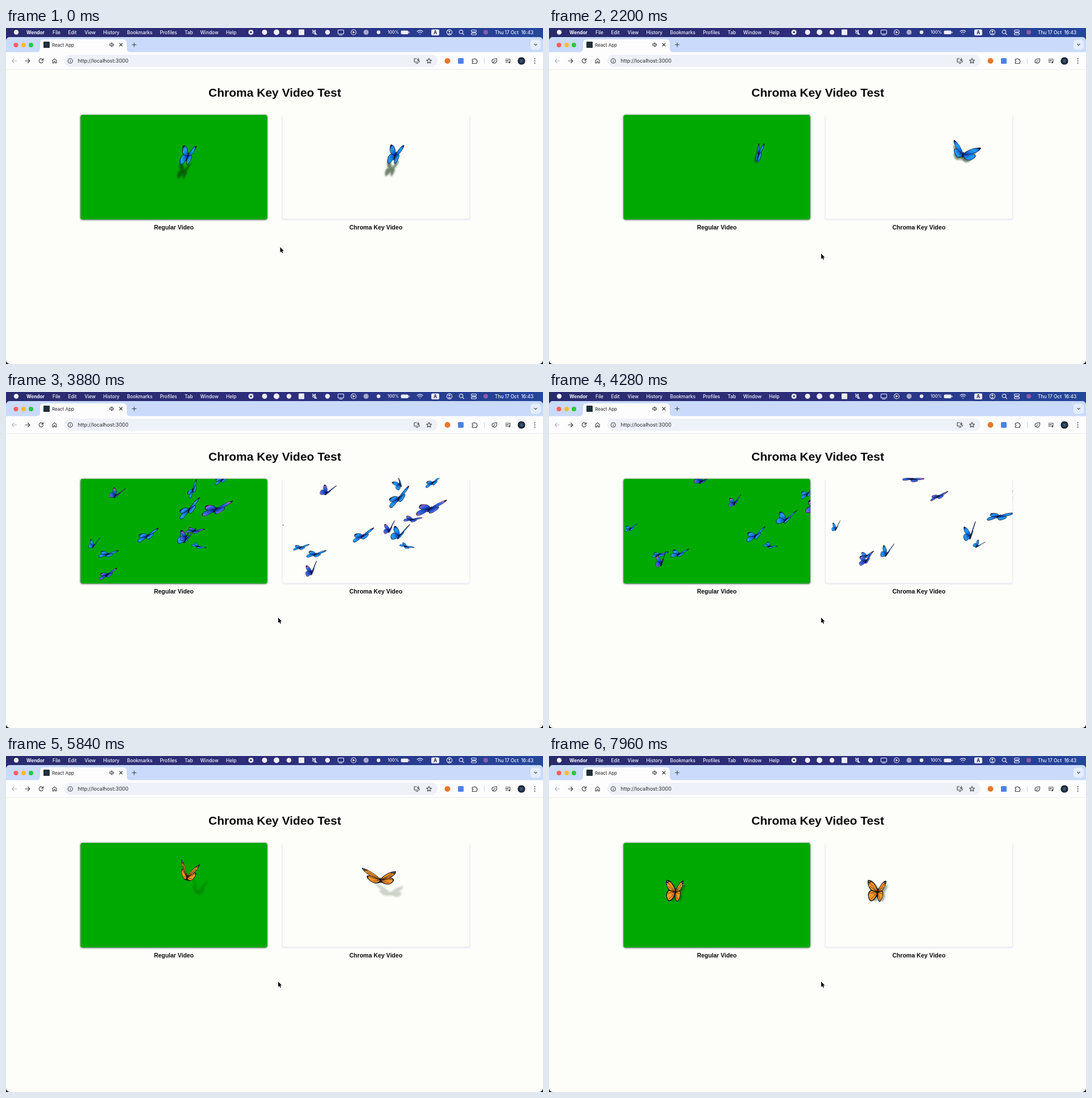
Recreate the animation shown at these times as an HTML page with a canvas. Size 947 px wide and 592 px high, loop 8000 ms.

```html
<!DOCTYPE html>
<html lang="en">
<head>
<meta charset="utf-8">
<title>Chroma Key Video Test</title>
<style>
html, body { margin: 0; width: 100%; height: 100%; overflow: hidden; background: #000; }
svg, canvas { position: absolute; left: 0; top: 0; width: 947px; height: 592px; display: block; }
text { font-family: Inter, "Liberation Sans", sans-serif; }
.menu text { font-size: 8.3px; font-weight: 500; fill: #f4f4fa; white-space: pre; }
.page text { font-family: "Liberation Sans", Arial, sans-serif; font-weight: 700; fill: #0a0a0a; text-anchor: middle; }
.line { fill: none; stroke-width: 1.1; stroke-linecap: round; stroke-linejoin: round; }
.menu .line { stroke: #eeeef8; }
.bar .line { stroke: #3c4043; }
</style>
</head>
<body>
<svg viewBox="0 0 947 592">
  <defs>
    <linearGradient id="sky">
      <stop offset="0" stop-color="#2a2b6e"/><stop offset=".5" stop-color="#2e2d7a"/><stop offset=".75" stop-color="#293a8c"/><stop offset="1" stop-color="#24469c"/>
    </linearGradient>
    <radialGradient id="face"><stop offset="0" stop-color="#3f6f86"/><stop offset=".6" stop-color="#23304a"/><stop offset="1" stop-color="#15171f"/></radialGradient>
    <filter id="soft" x="-10%" y="-10%" width="120%" height="125%"><feGaussianBlur stdDeviation="1.5"/></filter>
  </defs>
  <rect width="947" height="592" fill="#05050a"/>
  <rect width="947" height="24" fill="url(#sky)"/>
  <rect y="16" width="947" height="576" rx="7" fill="#fdfdfa"/>
  <path d="M0 43V23a7 7 0 0 1 7-7H940a7 7 0 0 1 7 7V43Z" fill="#c9dafa"/>

  <g class="menu">
    <circle cx="18" cy="7.5" r="4.2" fill="#f4f4fa"/>
    <text x="36" y="10.5" style="font-weight:700">Wendor</text>
    <text x="82" y="10.5">File</text><text x="109.5" y="10.5">Edit</text>
    <text x="138.5" y="10.5">View</text><text x="171.5" y="10.5">History</text>
    <text x="213.5" y="10.5">Bookmarks</text><text x="271.5" y="10.5">Profiles</text>
    <text x="315" y="10.5">Tab</text><text x="342.5" y="10.5">Window</text><text x="388" y="10.5">Help</text>
    <g fill="#eeeef8">
      <circle cx="432" cy="7.5" r="4.5"/><circle cx="456" cy="7.5" r="4.5"/>
      <circle cx="477" cy="7.5" r="5"/><circle cx="499" cy="7.5" r="4.2"/>
      <rect x="516" y="2.5" width="10" height="10" rx="1"/>
      <circle cx="567" cy="7.5" r="4.2"/><circle cx="635" cy="7.5" r="4.5" fill="#a9a8cc"/>
      <circle cx="657" cy="7.5" r="3.2"/>
      <rect x="696.5" y="4.5" width="13" height="6.5" rx="1.8"/><rect x="710.3" y="6.3" width="1.2" height="3" rx=".6"/>
      <rect x="750" y="2.5" width="14" height="10.5" rx="2"/>
      <path d="M611.5 5.2v4.6l4-2.3Z"/><path d="M779.2 10.6a3 2.6 0 0 1 5.6 0Z"/><circle cx="782" cy="6" r="1.6"/>
    </g>
    <rect x="430.5" y="6" width="3" height="3" fill="#2d2b72"/>
    <g class="line">
      <path d="M541 6h2l2.5-2.5v8L543 9h-2ZM540.5 3.5l7.5 8"/>
      <rect x="585.5" y="3.5" width="10" height="7" rx="1"/><path d="M588 12.5h5"/>
      <circle cx="613" cy="7.5" r="4.5"/><circle cx="782" cy="7.5" r="4.6"/>
      <path d="M725 6.2a7 7 0 0 1 10 0M727 8.3a4.3 4.3 0 0 1 6 0M729.3 10.7h1.4"/>
      <circle cx="802.5" cy="6.8" r="3.2"/><path d="M805 9.3l2.5 2.5"/>
      <rect x="820.5" y="3.5" width="9" height="3.4" rx="1.7"/><rect x="820.5" y="8.6" width="9" height="3.4" rx="1.7"/>
    </g>
    <circle cx="846" cy="7.5" r="4" fill="#8a5fa8"/>
    <text x="673" y="10.3" style="font-size:7.4px">100%</text>
    <text x="757" y="10.8" text-anchor="middle" style="fill:#2a2a6a;font-weight:700">A</text>
    <text x="862" y="10.5">Thu 17 Oct  16:43</text>
  </g>

  <g class="bar">
    <circle cx="17.5" cy="30" r="4" fill="#fe5f57"/><circle cx="31" cy="30" r="4" fill="#febc2e"/><circle cx="44" cy="30" r="4" fill="#28c840"/>
    <path d="M53 43q7 0 7-7V27q0-7 7-7H206q7 0 7 7v9q0 7 7 7Z" fill="#fdfdfe"/>
    <rect y="42.5" width="947" height="30.5" fill="#fdfdfe"/>
    <path d="M0 73.2H947" stroke="#e6e8ee" stroke-width=".8"/>
    <rect x="66" y="24" width="11" height="11" rx="1" fill="#20303a"/>
    <text x="81" y="32.5" font-size="8" fill="#202124">React App</text>
    <rect x="925" y="20.5" width="18" height="18" rx="5" fill="#e4edfd"/>
    <rect x="103" y="47" width="658" height="21.5" rx="10.7" fill="#eff1f9"/>
    <text x="126.5" y="61.2" font-size="9" fill="#26282c">http://localhost:3000</text>
    <g class="line">
      <path d="M183 28h1.8l2.2-2v7l-2.2-2H183ZM188.8 27.5a3 3 0 0 1 0 4"/>
      <path d="M200 27l5 5M205 27l-5 5M222.5 29.5h7M226 26v7M931.8 28.4l2.2 2.2 2.2-2.2"/>
      <path d="M18.5 58h-8M14 54.5l-3.5 3.5 3.5 3.5" style="stroke:#b4b7bb"/>
      <path d="M34 58h8M38.5 54.5L42 58l-3.5 3.5"/>
      <path d="M65.3 56.3a3.7 3.7 0 1 0 .2 2.6M65.6 53.8v2.8h-2.8"/>
      <path d="M82 57.2l3.5-3 3.5 3v4.6h-2.3v-2.6h-2.4v2.6H82Z"/>
      <circle cx="113.3" cy="58" r="4"/><path d="M113.3 57.8v2M113.3 56v.1"/>
      <path d="M724 54h-4v6h9v-2M723 62.3h3.5M727 53.2v4M725.3 55.8l1.7 1.7 1.7-1.7"/>
      <path d="M746 53.4l1.3 3 3.2.3-2.4 2.1.7 3.2-2.8-1.7-2.8 1.7.7-3.2-2.4-2.1 3.2-.3Z"/>
      <path d="M822.3 55h2.5a1.3 1.3 0 0 1 2.6 0h2.6v2.5a1.3 1.3 0 0 1 0 2.6v2.4h-7.7V60a1.3 1.3 0 0 0 0-2.6Z"/>
      <path d="M857.5 60.5a4 4 0 0 1 1-5q2-1.4 7-1.5.5 5-2 7.2-3 2-6-.7M859 61l3.5-4"/>
      <path d="M881 55h8M881 57.6h5M881 60.2h3.5M888.8 55v5.6"/><circle cx="887.6" cy="60.6" r="1"/>
    </g>
    <path d="M843.5 53v10" stroke="#c9d6f0"/>
    <circle cx="778.5" cy="58" r="5" fill="#e5782c"/>
    <rect x="797" y="53" width="10" height="10" rx="1.5" fill="#4c83e0"/>
    <circle cx="909" cy="58" r="6.6" fill="url(#face)"/>
    <g fill="#3c4043"><circle cx="932.5" cy="54.3" r="1"/><circle cx="932.5" cy="58" r="1"/><circle cx="932.5" cy="61.7" r="1"/></g>
  </g>

  <g class="page">
    <text x="474" y="120.5" font-size="21">Chroma Key Video Test</text>
    <rect x="131" y="153.2" width="330" height="185" rx="4" fill="#000" opacity=".6" filter="url(#soft)"/>
    <rect x="131.5" y="153" width="329" height="184.5" rx="4" fill="#00a902"/>
    <rect x="487.5" y="154" width="330" height="183.8" rx="4" fill="#cfcfe6" opacity=".7" filter="url(#soft)"/>
    <rect x="488" y="151.5" width="329" height="185" rx="4" fill="#fdfdfa"/>
    <text x="296" y="355.2" font-size="10.45">Regular Video</text>
    <text x="652.3" y="355.2" font-size="10.55">Chroma Key Video</text>
  </g>
</svg>
<canvas id="stage" width="947" height="592"></canvas>
<script>
const ctx = document.getElementById('stage').getContext('2d');
const LOOP = 8, LEAD = 0.08, BEAT = 0.1867;

// A pose holds three vectors: body (towards the head), left span, right span.
const REST_SHUT = [4, -18, -2, -6, 7, -6];
const REST_OPEN = [3, -13, -18, -16, 29, -2];
const GLIDE = [7, -20, -12.5, -3, 9, -3];
const SWARM_FLAT = [.3, -.34, -.75, .16, .75, -.1];
const SWARM_UP = [.2, -.5, -.5, -.35, .35, -.6];
const SOLO_UP = [-2, -8, -12, 8, 16, -4];
const SOLO_DOWN = [-2, -8, -6, 16, 18, 2];
const MONARCH_WIDE = [-2, -12, -30.5, -12, 27.5, -6];
const MONARCH_UP = [2, -13, -11, -22, 20, -13];
const MONARCH_REST = [3, -21, -19, -5, 13, -3.5];
const MONARCH_SHUT = [3, -21, -10, -6, 7, -4];

// Wing phases over one LEAD: staying flat, staying up, rising, falling.
const FLAT = -2.4, UP = .73, RISE = -.84, FALL = 2.3;

// x, y, step x, step y (per LEAD), size, tilt, wing phase, pink
const SWARM = [
  [62, 30, 15, -5, 21, .35, UP, 1], [191, 55, 13, -20, 29, -.4, FLAT, 0],
  [238, 54, 21, -1, 34, 0, FLAT, 1], [249, 2, 15, 5, 19, -.2, FLAT, 0],
  [198, 20, 9, -10, 20, -.8, RISE, 0], [117, 101, 23, 0, 25, -.15, FLAT, 0],
  [185, 108, 20, -7, 27, .15, UP, 0], [207, 119, 10, 0, 15, .6, FLAT, 0],
  [23, 118, 8, 3, 17, .1, FALL, 0], [47, 133, 10, 0, 21, .15, FLAT, 0],
  [47, 169, 4, -4, 21, -.15, RISE, 1], [186, 103, 2, -12, 19, -.1, UP, 1],
  [200, 92, 27, -20, 19, .3, FLAT, 1], [-18, 88, 6, 0, 15, 0, FLAT, 0]
];

const clamp = v => Math.max(0, Math.min(1, v));
const mix = (a, b, k) => a + (b - a) * k;
const blend = (p, q, k) => p.map((v, i) => mix(v, q[i], k));
const beat = (t, start, period = BEAT) => (1 - Math.cos(2 * Math.PI * (t - start) / period)) / 2;

const fore = new Path2D('M0 .05C.15 .45 .6 .9 1 .75C1.02 .5 .85 .15 .55 .02L0 0Z');
const hind = new Path2D('M0 .05L.55 .02C.85 -.1 .88 -.5 .6 -.8C.4 -.98 .1 -.55 0 -.1Z');

function wingPaint(stops) {
  const g = ctx.createRadialGradient(.1, 0, 0, .1, 0, 1.14);
  stops.forEach(([at, colour]) => g.addColorStop(at, colour));
  return g;
}
const PAINT = {
  blue: wingPaint([[0, '#0e2f9c'], [.25, '#1268dc'], [.6, '#22a0f2'], [.84, '#1c6cdc'], [.93, '#070a1c'], [1, '#070a1c']]),
  pink: wingPaint([[0, '#101a78'], [.35, '#2050d4'], [.62, '#3f6ae0'], [.82, '#b45cc6'], [.93, '#0a0a20'], [1, '#0a0a20']]),
  orange: wingPaint([[0, '#e0700c'], [.45, '#fb9c2a'], [.78, '#f58e1c'], [.85, '#15100c'], [1, '#15100c']])
};

function wing(sx, sy, bx, by, kind) {
  if (Math.abs(sx * by - sy * bx) < 4) return;
  ctx.save();
  ctx.transform(sx, sy, bx, by, 0, 0);
  ctx.strokeStyle = ctx.fillStyle = kind ? '#0a0c18' : '#0c300c';
  ctx.lineWidth = kind === 'orange' ? .07 : .04;
  for (const part of [hind, fore]) {
    if (kind) ctx.fillStyle = PAINT[kind];
    ctx.fill(part);
    if (kind) ctx.stroke(part);
  }
  if (kind === 'orange') {
    ctx.lineWidth = .03;
    ctx.beginPath();
    for (const [x, y] of [[.85, .62], [.76, .32], [.72, -.25], [.5, -.7]]) {
      ctx.moveTo(0, 0);
      ctx.lineTo(x, y);
    }
    ctx.stroke();
    ctx.fillStyle = '#f6efe2';
    for (const [x, y] of [[.93, .7], [.94, .52], [.84, .68], [.83, .32], [.7, -.5]]) ctx.fillRect(x - .03, y - .03, .06, .06);
  }
  ctx.restore();
}

function butterfly(x, y, [bx, by, lx, ly, rx, ry], kind) {
  ctx.save();
  ctx.translate(x, y);
  wing(rx, ry, bx, by, kind);
  wing(lx, ly, bx, by, kind);
  ctx.strokeStyle = kind ? '#0a0c1c' : '#0c300c';
  ctx.lineWidth = 1.4;
  ctx.lineCap = 'round';
  ctx.beginPath();
  ctx.moveTo(bx * .3, by * .3);
  ctx.lineTo(-bx * .4, -by * .4);
  ctx.stroke();
  ctx.restore();
}

function shadowed(x, y, pose, kind, dx, dy, alpha) {
  ctx.save();
  ctx.globalAlpha = alpha;
  ctx.filter = 'blur(1.6px)';
  butterfly(x + dx, y + dy, pose.map(v => v * .85));
  ctx.restore();
  butterfly(x, y, pose, kind);
}

function visitor(t) {
  const away = clamp(1 - t / .8), leave = Math.max(0, t - 2.34);
  const x = 238 - 49 * away ** 2 + 4 * clamp((t - 2.2) / .08) + 420 * leave ** 1.4;
  const y = 70 + 3 * away - 4 * Math.sin(Math.PI * away) - 260 * leave ** 1.3;
  const air = blend(GLIDE, REST_OPEN, .2 * beat(t, .04));
  const sit = blend(REST_SHUT, REST_OPEN, mix(.5, 1, clamp((t - 1.16) / 1.1)) * beat(t, 1.07));
  const pose = blend(sit, air, clamp(away * 4));
  shadowed(x, y, pose, 'blue', -3 - 4 * away - 25 * leave, 5 + 22 * away ** 1.2 + 90 * leave, .6);
}

function swarm(t) {
  const dt = t - 3.88;
  for (const [x, y, dx, dy, size, tilt, phase, pink] of SWARM) {
    const lift = .5 + .5 * Math.sin(phase + dt * 2 * Math.PI / .3);
    const co = size * Math.cos(tilt), si = size * Math.sin(tilt);
    const [bx, by, lx, ly, rx, ry] = blend(SWARM_FLAT, SWARM_UP, lift);
    const turn = (u, v) => [u * co - v * si, u * si + v * co];
    const pose = [...turn(bx, by), ...turn(lx, ly), ...turn(rx, ry)];
    butterfly(x + dx * dt / LEAD, y + dy * dt / LEAD, pose, pink ? 'pink' : 'blue');
  }
}

function solo(t) {
  const dt = t - 4.8;
  butterfly(265 + 200 * dt, 71 + 100 * dt, blend(SOLO_UP, SOLO_DOWN, beat(t, 4.795)), 'blue');
}

function monarch(t) {
  const away = clamp((6.5 - t) / 1.2), calm = clamp((t - 6.9) / .3);
  const hover = beat(t, 6.675) * (1 - calm);
  const x = 91.5 - 3 * hover + 260 * away ** 1.6;
  const y = 85 - 6 * hover + 2 * calm - 60 * away * (1 - .5 * away) + 6 * Math.sin(away * 14);
  const air = blend(MONARCH_WIDE, MONARCH_UP, beat(t, 6.675));
  const sit = blend(MONARCH_REST, MONARCH_SHUT, beat(t, 8.03, .62));
  shadowed(x, y, blend(air, sit, calm), 'orange', mix(14, 5, calm) + 8 * away, mix(9, 3, calm) + 30 * away, mix(.2, .4, calm));
}

function scene(t) {
  if (t < 2.8) visitor(t);
  else if (t < 4.45) swarm(t);
  else if (t < 5.3) solo(t);
  else monarch(t);
}

function video(x, y, t) {
  ctx.save();
  ctx.beginPath();
  ctx.roundRect(x, y, 329.5, 185, 4);
  ctx.clip();
  ctx.translate(x, 153);
  scene(t);
  ctx.restore();
}

function pointer(t) {
  const k = clamp(t / .4), ease = k * k * (3 - 2 * k);
  ctx.save();
  ctx.translate(mix(483.5, 480, ease), mix(386, 397.5, ease));
  ctx.beginPath();
  [[0, 0], [0, 9.5], [2.1, 7.6], [3.5, 10.7], [5, 10], [3.6, 7], [6.3, 6.8]].forEach(p => ctx.lineTo(...p));
  ctx.closePath();
  ctx.lineWidth = 1.2;
  ctx.strokeStyle = '#fff';
  ctx.stroke();
  ctx.fillStyle = '#080808';
  ctx.fill();
  ctx.restore();
}

function draw(now) {
  const t = now / 1000 % LOOP;
  ctx.clearRect(0, 0, 947, 592);
  video(131.3, 153, t);
  video(488, 151.5, t + LEAD);
  pointer(t);
  requestAnimationFrame(draw);
}
draw(performance.now());
</script>
</body>
</html>
```
